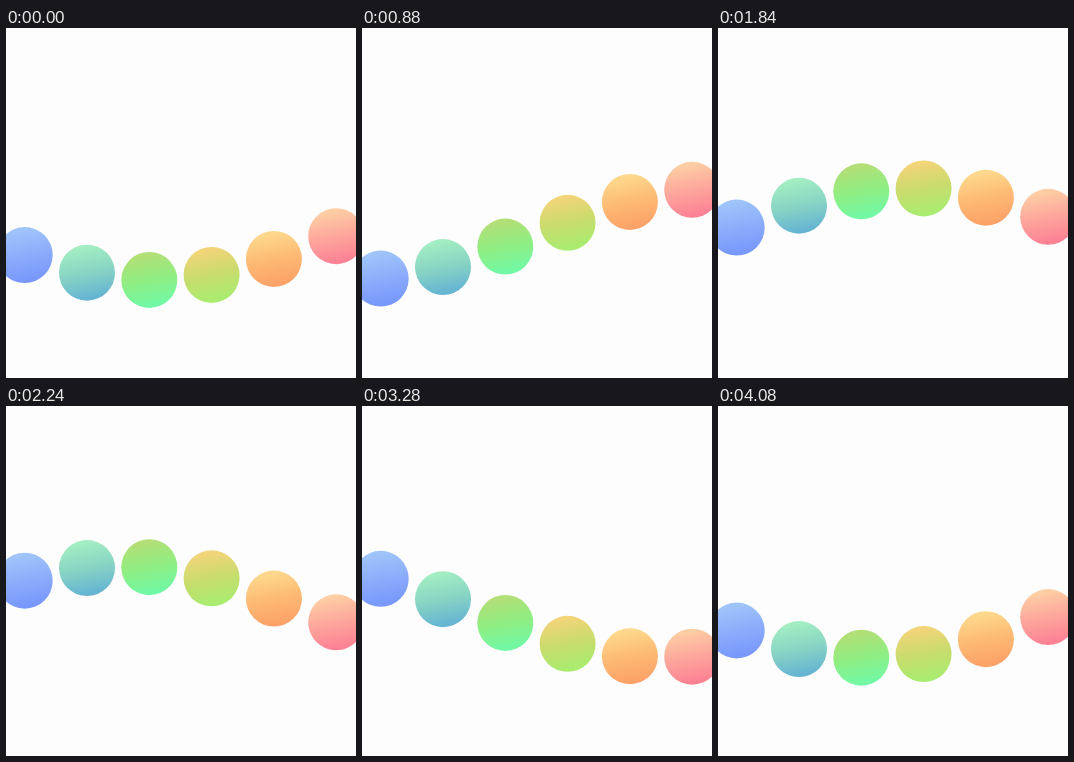
An HTML page that plays this animation: 350 by 350 pixels, repeating every 4.12 s.

```html
<!DOCTYPE html>
<html lang="en">
<head>
<meta charset="utf-8">
<title>Rainbow wave</title>
<style>
  html, body { margin: 0; width: 100%; height: 100%; overflow: hidden; background: #fdfdfd; }
  svg { display: block; width: 100%; height: 100%; }
</style>
</head>
<body>
<svg id="stage" viewBox="0 0 350 350"><defs></defs></svg>
<script>
const LOOP = 4120, STEP = 40;
const RADIUS = 28, SPACING = 62.3, FIRST_X = 18.7;
const MIDDLE_Y = 206, SWING = 46, START_PHASE = 0.475, PHASE_STEP = Math.PI / 6;

// top, middle and bottom colour of each ball
const palettes = [
  ['#9fc4fa', '#8cadfb', '#7898fc'],
  ['#a2edc2', '#88d4c4', '#66b5d2'],
  ['#b2df76', '#8fee83', '#72f8a4'],
  ['#f2d479', '#c8dc6c', '#a9ec70'],
  ['#fdd88c', '#fdba74', '#fca268'],
  ['#fdcda4', '#fda69c', '#fc8294']
];

const stage = document.getElementById('stage');
const defs = stage.querySelector('defs');

function add(parent, tag, attributes) {
  const node = document.createElementNS('http://www.w3.org/2000/svg', tag);
  for (const [key, value] of Object.entries(attributes)) node.setAttribute(key, value);
  return parent.appendChild(node);
}

const balls = palettes.map((colors, i) => {
  const id = 'shade' + i;
  const gradient = add(defs, 'linearGradient', { id, x1: 0.4, y1: 0, x2: 0.6, y2: 1 });
  colors.forEach((color, k) =>
    add(gradient, 'stop', { offset: [0.06, 0.5, 0.94][k], 'stop-color': color }));
  return add(stage, 'circle', { cx: FIRST_X + i * SPACING, r: RADIUS, fill: `url(#${id})` });
});

function draw(time) {
  const t = Math.floor((time % LOOP) / STEP) * STEP;
  balls.forEach((ball, i) => {
    const phase = START_PHASE + i * PHASE_STEP + (t / LOOP) * 2 * Math.PI;
    ball.setAttribute('cy', (MIDDLE_Y + SWING * Math.sin(phase)).toFixed(2));
  });
}

const start = performance.now();
function tick() {
  draw(performance.now() - start);
  requestAnimationFrame(tick);
}
tick();
</script>
</body>
</html>
```
